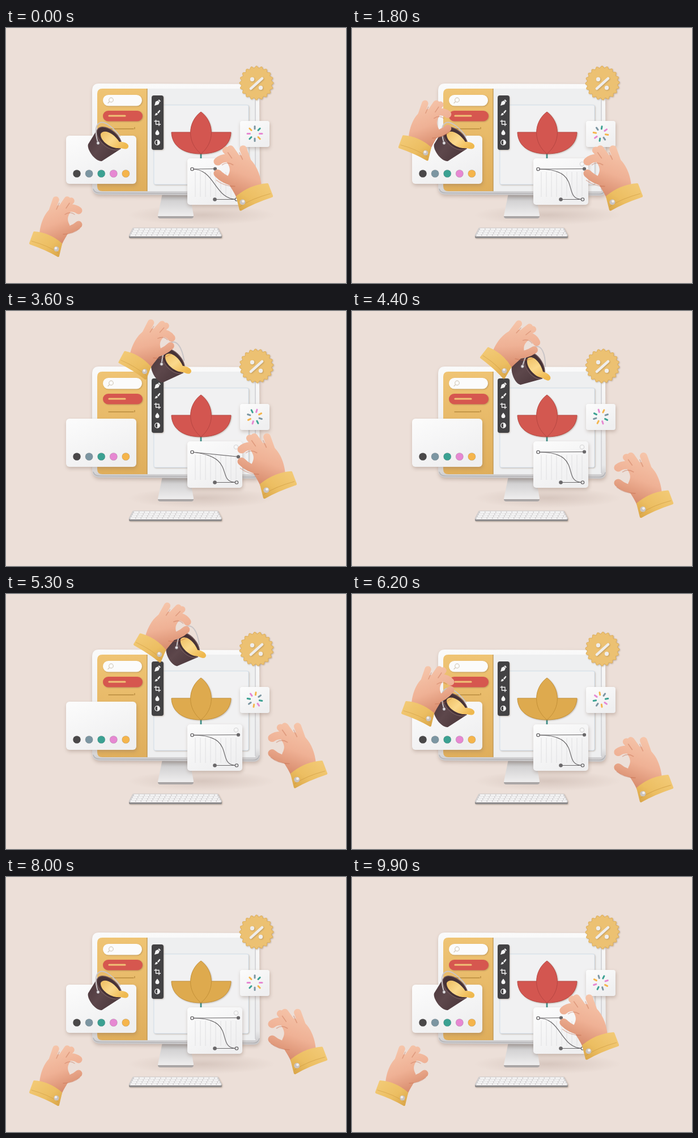
An HTML page that plays this animation: 600x450 px, repeating every 10000 ms.

```html
<!DOCTYPE html>
<html lang="en">
<head>
<meta charset="utf-8">
<title>Design desk</title>
<style>
html, body { margin: 0; width: 100%; height: 100%; overflow: hidden; background: #ecdfd8; }
svg { display: block; width: 100vw; height: 100vh; }
.card { filter: drop-shadow(1px 3px 3px #80665959); }
.soft { filter: drop-shadow(1px 1.5px 1.2px #70553859); }
.line { fill: none; stroke-linecap: round; stroke-linejoin: round; }
.skin { stroke: url(#skin); stroke-width: 13; }
.slim { stroke-width: 11.5; }
</style>
</head>
<body>
<svg viewBox="0 0 600 450">
<defs>
  <linearGradient id="body" x2="0" y2="1">
    <stop stop-color="#fafafa"/><stop offset=".88" stop-color="#e9e9ea"/><stop offset="1" stop-color="#c6c5c7"/>
  </linearGradient>
  <linearGradient id="white" x2=".6" y2="1"><stop stop-color="#fcfcfc"/><stop offset="1" stop-color="#efeff0"/></linearGradient>
  <linearGradient id="gold" x2="0" y2="1"><stop stop-color="#efc474"/><stop offset="1" stop-color="#dfae5c"/></linearGradient>
  <linearGradient id="steel" x2="0" y2="1">
    <stop stop-color="#a9a8a9"/><stop offset=".3" stop-color="#d3d2d3"/><stop offset="1" stop-color="#f3f2f2"/>
  </linearGradient>
  <linearGradient id="tin" x2="1" y2=".7"><stop stop-color="#4a353a"/><stop offset=".5" stop-color="#5d474b"/><stop offset="1" stop-color="#4b373b"/></linearGradient>
  <linearGradient id="paint" x2="1" y2=".6"><stop stop-color="#edbd62"/><stop offset=".5" stop-color="#fbd98c"/><stop offset="1" stop-color="#efb94f"/></linearGradient>
  <linearGradient id="skin" gradientUnits="userSpaceOnUse" x1="78" y1="300" x2="108" y2="376">
    <stop stop-color="#f6c6ab"/><stop offset=".55" stop-color="#efb195"/><stop offset="1" stop-color="#d88c6d"/>
  </linearGradient>
  <linearGradient id="cuff" x2="1" y2="1"><stop stop-color="#f3cb78"/><stop offset=".6" stop-color="#ecbe62"/><stop offset="1" stop-color="#d9a548"/></linearGradient>
  <radialGradient id="floor"><stop stop-color="#8b6f6338"/><stop offset="1" stop-color="#8b6f6300"/></radialGradient>
</defs>

<rect width="600" height="450" fill="#ecdfd8"/>
<ellipse cx="345" cy="330" rx="130" ry="18" fill="url(#floor)"/>

<!-- monitor -->
<path d="M276 292H324L331 330Q331 336 327 336H272Q268 336 268 331Z" fill="url(#steel)"/>
<path d="M268 332H331Q331 336 327 336H272Q268 336 268 332Z" fill="#aaa6a6"/>
<g class="card">
  <path d="M164 98L431 99Q447 100 447 114L448 284Q448 296 437 296L164 294Q152 293 152 280V111Q152 98 164 98Z" fill="url(#body)"/>
</g>
<path d="M154 284Q156 291 166 291L436 293Q445 293 447 285" class="line" stroke="#b1b0b3" stroke-width="1.2"/>
<path d="M249 107H432Q440 107 440 115V288H249Z" fill="#eeeff0"/>
<path d="M440 112V286" stroke="#cfcfd2" stroke-width="1.6"/>
<path d="M170 107H249V288H170Q161 288 161 279V116Q161 107 170 107Z" fill="url(#gold)"/>
<path d="M249 107V288" stroke="#b98f4a" stroke-width="1.2"/>
<rect x="261" y="136" width="167" height="140" rx="3" fill="#f1f1f2" stroke="#d3e1ee" class="soft"/>
<g class="soft">
  <rect x="171" y="118" width="69" height="19.5" rx="9.75" fill="#fbfbfb"/>
  <rect x="171" y="146" width="70" height="18.5" rx="9.25" fill="#d6574f"/>
  <path d="M182 155H210" class="line" stroke="#f0c277" stroke-width="3.2"/>
</g>
<g class="line" stroke="#d3cabb" stroke-width="1.2"><circle cx="185.500" cy="127" r="3.800"/><path d="M182.500 130L180 132.500"/></g>
<path d="M181 178H225M227 175.500V178" class="line" stroke="#b98c3f" stroke-width="1.400"/>

<!-- toolbar -->
<rect x="257" y="119" width="21" height="96" rx="4" fill="#434244" class="soft"/>
<g fill="#f4f4f4">
  <path d="M262 137L264 130L268 128L271 131L269 135Z M268.500 127.500L270 126L273 129L271.500 130.500Z"/>
  <path d="M262 154Q264 153 264 150.500Q267 149 268 152Q266 155 262 154ZM267 149L271 144.500L272.500 146L269 151Z"/>
  <path d="M264.500 162V170H273M261.500 164.500H270V173" fill="none" stroke="#f4f4f4" stroke-width="1.300"/>
  <path d="M267 179.500Q270.500 183.500 270.500 185.500A3.500 3.500 0 0 1 263.500 185.500Q263.500 183.500 267 179.500Z"/>
  <circle cx="267" cy="202" r="4.300" fill="none" stroke="#f4f4f4" stroke-width="1.300"/><path d="M267 197.700A4.300 4.300 0 0 1 267 206.300Z"/>
</g>

<!-- flower -->
<path d="M344 218V234" stroke="#3f8f88" stroke-width="2.800"/>
<g id="flower" class="soft" stroke-linejoin="round">
  <path d="M292 184H397C396 208 376 222 344 222C312 222 293 208 292 184Z"/>
  <path d="M344 148C368 166 369 202 344 222C319 202 320 166 344 148Z"/>
</g>

<!-- keyboard -->
<g class="soft">
  <path d="M224 353H374L381 366V369Q381 371 378 371H220Q217 371 217 369V366Z" fill="#8f8c8d"/>
  <path d="M224 352.500H374L381 365.500Q381 368 378 368H220Q217 368 217 365.500Z" fill="#d3d1d2"/>
</g>
<g stroke="#fafafa" stroke-width="2.600" stroke-dasharray="8 1.500">
  <path d="M226 355H373M224 358.500H375M222 362H377M220 365.500H379"/>
</g>

<!-- discount badge -->
<g class="soft"><path id="seal" fill="#ecc172" stroke="#dfb05c"/></g>
<g class="soft" fill="#efedeb">
  <path d="M432 107L452 89" class="line" stroke="#efedeb" stroke-width="4.500"/>
  <circle cx="434.500" cy="90.500" r="3.700"/><circle cx="449.500" cy="105.500" r="3.700"/>
</g>

<!-- spinner card -->
<rect x="413" y="164" width="52" height="46" rx="4" fill="url(#white)" class="card"/>
<g id="spin" class="line" stroke-width="3"></g>

<!-- palette card -->
<rect x="106" y="190" width="124" height="85" rx="6" fill="url(#white)" class="card"/>
<g id="dots" stroke="#0002"></g>

<!-- curve card -->
<rect x="320" y="230" width="97" height="82" rx="5" fill="url(#white)" class="card"/>
<path id="bars" stroke="#e3e3e5" stroke-width="1.200"/>
<circle cx="406" cy="240" r="3.800" fill="#f7f7f7" stroke="#d2d2d4"/>
<g class="line" stroke="#6a686a" stroke-width="1.200">
  <path id="curve"/><path id="arm"/>
  <g fill="#fff" stroke-width="1.400"><circle cx="328.500" cy="249" r="2.600"/><circle cx="407" cy="302.500" r="2.600"/></g>
  <circle cx="368.500" cy="302.500" r="2.700" fill="#6a686a"/><circle id="knob" r="2.500" fill="#6a686a"/>
</g>

<!-- bucket -->
<g id="bucket">
  <path d="M161 179L145 205C142 214 157 236 169 235L203 213Z" fill="url(#tin)"/>
  <ellipse cx="182" cy="195" rx="26" ry="14.500" transform="rotate(41 182 195)" fill="#463236" stroke="#70585b" stroke-width="1.500"/>
  <path d="M167 187C172 178 189 184 200 201C207 200 218 204 216 210C213 217 205 211 199 212C186 213 166 200 167 187Z" fill="url(#paint)"/>
  <path id="bail" class="line" stroke="#c9c5c7" stroke-width="2"/>
  <circle cx="162.500" cy="203" r="2.600" fill="#e6e3e5" stroke="#8b8388"/>
</g>

<!-- hands -->
<g id="left">
  <g class="line">
    <path class="skin slim" d="M78 332L88 303"/>
    <path class="skin slim" d="M93 325L108 303"/>
    <path class="skin slim" d="M100 322L115 305"/>
    <path d="M59 364C61 338 74 313 94 313C108 313 116 319 113 326C108 334 108 339 112 347C116 358 104 368 98 384Z" fill="url(#skin)"/>
    <path class="skin index"/>
    <path class="skin thumb"/>
    <path d="M94 309L89 320M112 309L106 318M104 329Q113 323 121 329M101 364Q118 364 130 354" stroke="#b9603f" stroke-opacity=".35" stroke-width="1.500"/>
  </g>
  <g stroke-linejoin="round">
    <path d="M50 361Q76 363 97 381L92 402Q72 390 43 380Z" fill="url(#cuff)" stroke="url(#cuff)" stroke-width="4"/>
    <path d="M45 376Q74 384 93 397" class="line" stroke="#c8943a" stroke-opacity=".5"/>
    <circle cx="89" cy="390" r="4.500" fill="#c9c3c0"/><circle cx="88" cy="388.500" r="2.200" fill="#f1eeec"/>
  </g>
</g>
</svg>
<script>
const LOOP = 10000, TAU = 2 * Math.PI;
const $ = id => document.getElementById(id);
const set = (el, name, value) => el.setAttribute(name, value);
const range = (n, f) => Array.from({length: n}, (_, i) => f(i));

const inks = ['#4a4849', '#7c96a2', '#3ba192', '#e688d2', '#f5b54c'];
$('dots').innerHTML = inks
  .map((ink, i) => `<circle cx="${125 + i * 21.6}" cy="257" r="6.6" fill="${ink}"/>`).join('');
$('spin').innerHTML = range(8, i =>
  `<path stroke="${inks[1 + i % 4]}" d="M439 178V173.500" transform="rotate(${i * 45} 439 186.500)"/>`).join('');
set($('bars'), 'd', range(9, i => `M${334 + i * 9} 254V298`).join(''));

// Scalloped seal outline with 20 teeth
set($('seal'), 'd', 'M' + range(160, i => {
  const a = i * TAU / 160, r = 28.3 + 1.7 * Math.cos(20 * a);
  return `${442 + r * Math.cos(a)} ${97 + r * Math.sin(a)}`;
}).join('L') + 'Z');

const left = $('left'), right = left.cloneNode(true);
right.id = 'right';
left.after(right);

const progress = (t, a, b) => Math.min(1, Math.max(0, (t - a) / (b - a)));
const bump = (t, a, b) => Math.sin(Math.PI * progress(t, a, b));
const mix = (a, b, u) => `rgb(${a.map((v, i) => Math.round(v + (b[i] - v) * u))})`;

function ease(t, a, b) {
  const u = progress(t, a, b);
  return u < .5 ? 4 * u ** 3 : 1 - 4 * (1 - u) ** 3;
}

// Rises to 1 from a to b, falls back to 0 from c to d
const span = (t, a, b, c, d) => ease(t, a, b) - ease(t, c, d);

function poseHand(el, grip, transform) {
  set(el, 'transform', transform);
  set(el.querySelector('.index'), 'd', `M100 321Q118 314 128 ${322 + 3 * grip}`);
  set(el.querySelector('.thumb'), 'd', `M99 358Q117 ${357 - 4 * grip} 128 ${347 - 8 * grip}`);
}

// The left hand reaches for the bucket, carries it over the flower and puts it back
function drawPour(t) {
  const reach = span(t, 600, 1900, 6350, 7600);
  const grip = span(t, 2250, 2700, 6200, 6600);
  const lift = span(t, 2900, 3500, 5400, 5900);
  const slide = span(t, 3100, 3900, 5200, 5750);
  const dx = 146 * slide, dy = -113 * lift;
  const tilt = 10 * slide + 8 * bump(t, 3900, 5100);

  const x = 46 * reach - 24 * bump(reach, 0, 1) - 16 * bump(t, 1700, 2700) + dx;
  const y = -170 * reach + dy;
  poseHand(left, grip, `translate(${x} ${y}) rotate(${tilt} 88 350)`);

  set($('bucket'), 'transform', `translate(${dx} ${dy}) rotate(${tilt} 134 182)`);
  set($('bail'), 'd', `M162.500 203C${150 + 10 * lift} ${164 - 6 * lift} ${170 + 16 * lift} ${151 - 8 * lift} 201 191`);
}

// The right hand drags the curve handle, leaves to hover, then drags it back
function drawDrag(t) {
  const pull = span(t, 0, 1500, 9000, 9800);
  const away = span(t, 3700, 4100, 8100, 8800);
  const dip = 13 * bump(t, 2300, 4000);
  const hover = 34 + 14 * Math.cos(TAU * (t - 6450) / 2400);

  const x = 409 + 54 * away - 42 * (1 - pull), y = 248 + dip + hover * away;
  poseHand(right, .5 * (1 - away), `translate(${x} ${y}) scale(-1.12 1.08) translate(-134 -335)`);

  const hx = 369 + 41 * pull, hy = 248.5 + dip;
  set($('curve'), 'd', `M328.5 249C${hx} ${hy} 368 302.5 407 302.5`);
  set($('arm'), 'd', `M328.5 249L${hx} ${hy}M368 302.5H407`);
  set($('knob'), 'cx', hx);
  set($('knob'), 'cy', hy);
}

function draw(t) {
  drawPour(t);
  drawDrag(t);

  const tint = span(t, 4300, 4900, 9100, 9500);
  set($('flower'), 'fill', mix([211, 86, 80], [222, 170, 78], tint));
  set($('flower'), 'stroke', mix([182, 70, 66], [196, 145, 56], tint));

  set($('seal'), 'transform', `rotate(${t * 90 / LOOP} 442 97)`);
  set($('spin'), 'transform', `rotate(${t * 5 * 360 / LOOP} 439 186.5)`);
}

const start = performance.now();
function tick() {
  const t = (performance.now() - start) % LOOP;
  draw(Math.floor(t / 100) * 100);
  requestAnimationFrame(tick);
}
tick();
</script>
</body>
</html>
```
